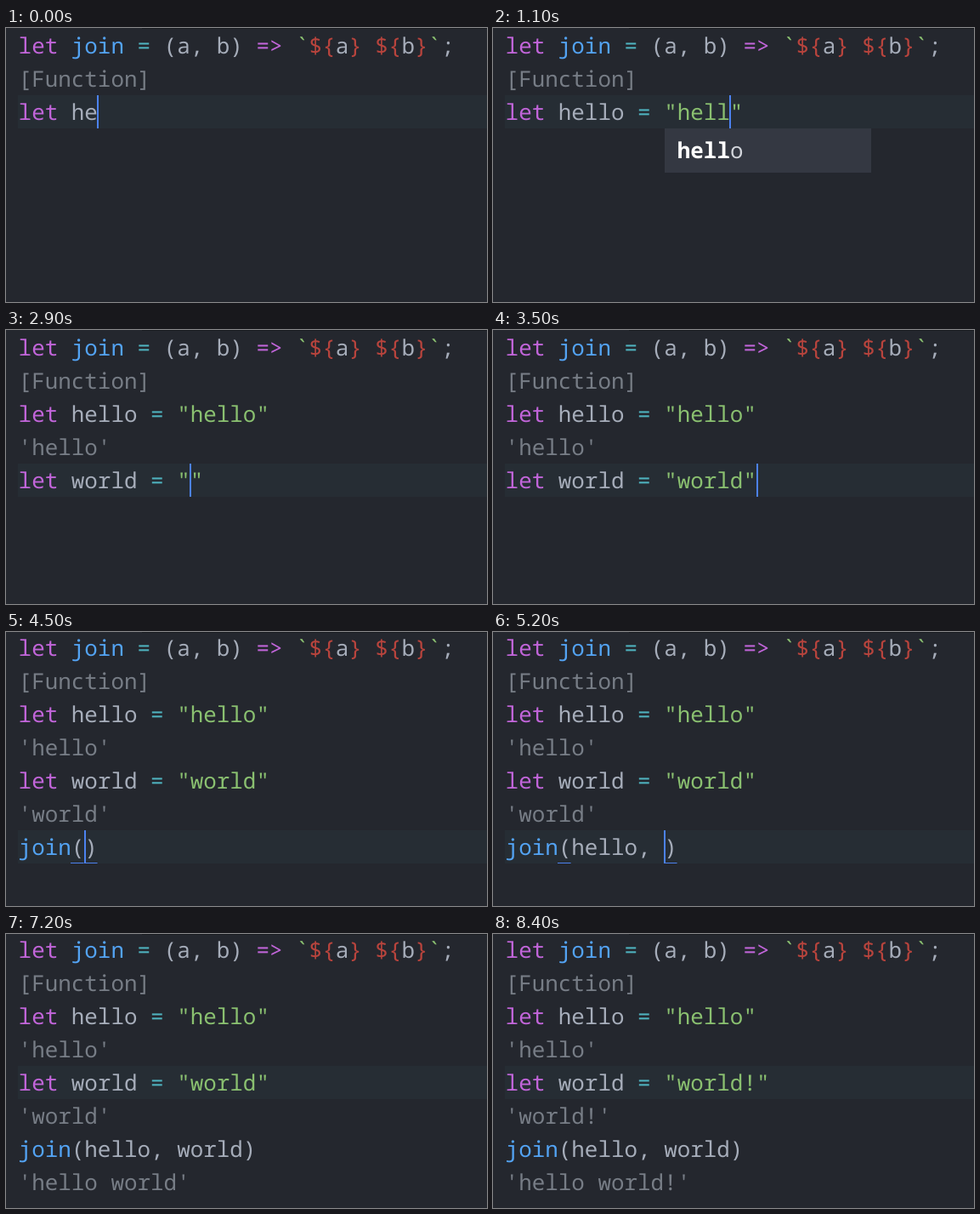
These frames come from a looping animation (566 px wide and 322 px high, 8500 ms). An HTML page:

```html
<!DOCTYPE html>
<html lang="en">
<head>
<meta charset="utf-8">
<title>Inline evaluation</title>
<style>
  html, body { margin: 0; width: 100%; height: 100%; overflow: hidden; background: #24272e; }
  svg { display: block; }
  text {
    font-family: "Noto Sans Mono", "DejaVu Sans Mono", monospace;
    font-size: 25.92px;
    font-weight: 500;
    font-variant-ligatures: none;
    text-rendering: geometricPrecision;
    white-space: pre;
    fill: #a6adba;
  }
  .keyword { fill: #c165d9; }
  .name { fill: #53a3f3; }
  .operator { fill: #4fb3bf; }
  .string { fill: #8ac070; }
  .embed { fill: #b8443d; }
  .result { fill: #777d86; }
  .option { fill: #d3d6dc; }
  .match { fill: #fff; font-weight: bold; }
  .active { fill: #262d34; }
  .caret { fill: #4c82f0; }
  .popup { fill: #343842; }
</style>
</head>
<body>
<svg id="stage" width="566" height="322" viewBox="0 0 566 322"></svg>
<script>
const LOOP = 8500, LEFT = 14.6, CHAR = 15.55, ROW = 39, OPTION = 48;
const stage = document.getElementById("stage");
const steps = [];
let state = {
  t: 0, row: 2, col: 6, scroll: 0, popup: null, blinkFrom: 0,
  lines: ["let join = (a, b) => `${a} ${b}`;", "[Function]", "let he"]
};
steps.push(state);

function at(t, change) {
  const next = { ...state, popup: null, ...change, t };
  if (next.row !== state.row || next.col !== state.col) next.blinkFrom = t;
  steps.push(state = next);
}

function type(start, chars, words = [], closer = "") {
  [...chars].forEach((char, i) => {
    const { row, col } = state, lines = [...state.lines];
    lines[row] = lines[row].slice(0, col) + char + closer + lines[row].slice(col);
    const typed = chars.slice(0, i + 1);
    const options = words.filter(word => word.startsWith(typed));
    const popup = options.length ? { options, typed, col: col - i } : null;
    at(start + i * 100, { lines, col: col + 1, popup });
  });
}

const stepOver = t => at(t, { col: state.col + 1 });
const enter = (t, result) =>
  at(t, { lines: [...state.lines, result, ""], row: state.row + 2, col: 0 });

type(100, "llo = ");
type(700, '"', [], '"');
type(800, "hello", ["hello"]);
stepOver(1300);
enter(1500, "'hello'");
type(1600, "let", ["let"]);
type(2000, " ");
type(2100, "world", ["while", "window", "with"]);
type(2600, " = ");
type(2900, '"', [], '"');
type(3000, "world", ["world", "while", "with"]);
stepOver(3500);
enter(3700, "'world'");
at(3800, { scroll: 2 });
type(4100, "join");
type(4500, "(", [], ")");
type(4600, "hello", ["hello"]);
type(5100, ", ");
type(5300, "world", ["world", "while", "with"]);
stepOver(5800);
enter(6000, "'hello world'");
at(6200, { row: 6, col: 18 });
at(6300, { row: 4, col: 19 });
at(6500, { col: 18 });
type(7700, "!");
at(8200, { lines: state.lines.map(line => line.replace(/^('.*world)'/, "$1!'")) });

const columnX = col => LEFT + col * CHAR;
const rect = (cls, x, y, w, h) =>
  `<rect class="${cls}" x="${x}" y="${y}" width="${w}" height="${h}"/>`;
const span = (cls, text) => `<tspan class="${cls}">${text}</tspan>`;

function kind(token) {
  if (token === "let" || token === "=>") return "keyword";
  if (token === "=") return "operator";
  if (token === "join") return "name";
  if (token === "${" || token === "}") return "embed";
  return /^["`]/.test(token) ? "string" : "";
}

function highlight(line) {
  if (/^['[]/.test(line)) return span("result", line);
  return line.split(/(\blet\b|=>|=|join(?= =|\()|"[^"]*"?|`|\$\{|\})/)
    .filter(Boolean).map(token => span(kind(token), token)).join("");
}

function drawBrackets(line, col, top) {
  if (!line.startsWith("join(")) return "";
  const pair = [line.indexOf("("), line.indexOf(")")];
  if (!pair.some(p => col === p || col === p + 1)) return "";
  return pair.map(p => rect("caret", Math.floor(columnX(p)), top + 38, CHAR, 1)).join("");
}

function drawPopup({ options, typed, col }, top) {
  const x = columnX(col);
  return rect("popup", Math.round(x - 15), top, 243, 4 + options.length * OPTION) +
    options.map((word, i) => `<text x="${x}" y="${top + 35 + i * OPTION}">` +
      span("match", typed) + span("option", word.slice(typed.length)) + "</text>").join("");
}

function draw(s, caretOn) {
  const topOf = row => 1 + row * ROW - s.scroll;
  const top = topOf(s.row);
  stage.innerHTML =
    rect("active", 14, top, 552, ROW) +
    '<rect x="160" width="406" height="1" fill="#181b20"/>' +
    s.lines.map((line, i) =>
      `<text x="${LEFT}" y="${topOf(i) + 29}">${highlight(line)}</text>`).join("") +
    drawBrackets(s.lines[s.row], s.col, top) +
    (caretOn ? rect("caret", Math.floor(columnX(s.col)), top, 2, ROW) : "") +
    (s.popup ? drawPopup(s.popup, top + ROW) : "");
}

let shown = "";
const origin = performance.now();
function tick() {
  const t = Math.max(0, performance.now() - origin) % LOOP;
  const index = steps.findLastIndex(step => step.t <= t);
  const caretOn = (t - steps[index].blinkFrom) % 800 < 400;
  const key = index + "/" + caretOn;
  if (key !== shown) draw(steps[index], caretOn);
  shown = key;
  requestAnimationFrame(tick);
}
tick();
</script>
</body>
</html>
```
